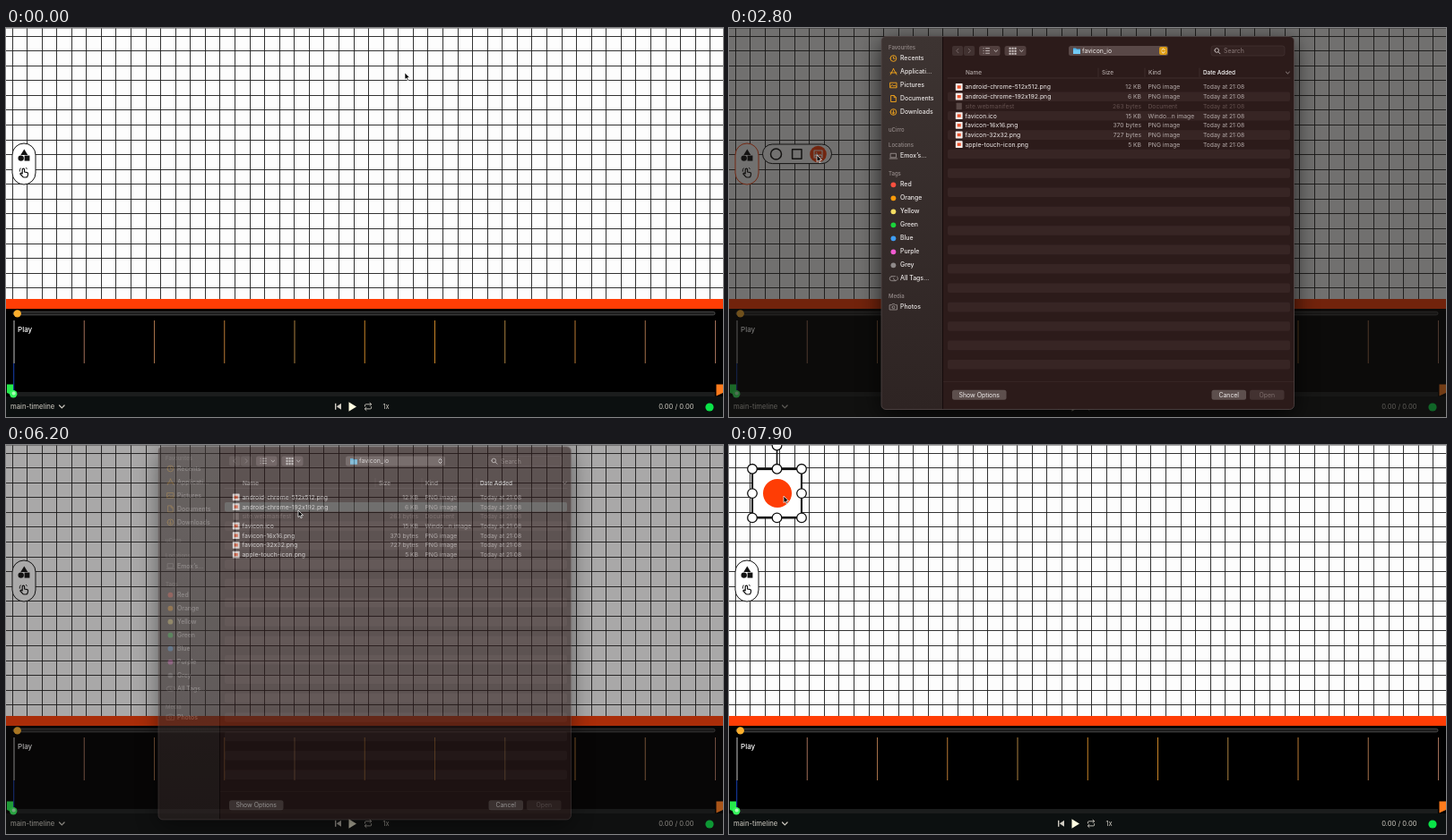
Write an HTML page that moves like this. It is 800 px wide and 435 px high and loops after 8 s.

```html
<!DOCTYPE html>
<html lang="en">
<head>
<meta charset="utf-8">
<title>Timeline editor</title>
<style>
html, body { margin: 0; height: 100%; overflow: hidden; background: #000; }
svg { display: block; width: 100vw; height: 100vh; font-family: Inter, Roboto, sans-serif; }
.line { fill: none; stroke: currentColor; stroke-linecap: round; stroke-linejoin: round; }
.menu { color: #111; }
.item circle:first-child { fill: none; }
.item.on circle:first-child { fill: #ff430f; }
.item.on { color: #fff; }
.window { filter: drop-shadow(0 6px 13px #000b); }
</style>
</head>
<body>
<svg id="stage" viewBox="0 0 800 435"></svg>
<script>
const LOOP = 8000, STEP = 100;
const range = n => [...Array(n).keys()];
const rect = (x, y, w, h, fill, r = 0, more = '') =>
  `<rect x="${x}" y="${y}" width="${w}" height="${h}" rx="${r}" fill="${fill}" ${more}/>`;
const circle = (x, y, r, fill, more = '') =>
  `<circle cx="${x}" cy="${y}" r="${r}" fill="${fill}" ${more}/>`;
const path = (d, color, width = 1) =>
  `<path class="line" d="${d}" style="color:${color}" stroke-width="${width}"/>`;
const shape = (d, fill) => `<path d="${d}" fill="${fill}"/>`;
// y is the vertical middle of the text
const text = (x, y, s, size, fill, more = '') =>
  `<text x="${x}" y="${y + size * 0.36}" font-size="${size}" fill="${fill}" ${more}>${s}</text>`;
const group = (id, inner, more = '') => `<g id="${id}" ${more}>${inner}</g>`;
const INK = '#111', ORANGE = '#ff3d05', CREAM = '#cfcbc2', MIDDLE = 'text-anchor="middle"';

function grid() {
  const cols = range(49).map(i => `M${Math.floor(7 + i * 16.57) + 0.5} 0V303`);
  const rows = range(18).map(i => `M0 ${Math.floor(9 + i * 16.58) + 0.5}H800`);
  return rect(0, 0, 800, 304, '#fdfdfd') + path(cols.join('') + rows.join(''), '#1c1c1c', 0.9)
    + rect(0, 0, 800, 0.6, '#777');
}

function timeline() {
  const tints = ['#a06e58', '#a5704a', '#b97a35', '#a98040', '#c88428'];
  const ticks = range(11).map(i => {
    const color = i ? tints[Math.min(i - 1, 10 - i)] : '#c4c4c4';
    return rect(8.5 + i * 78.25, 327, 1, 48, color);
  }).join('');
  return rect(0, 303, 800, 11, ORANGE) + rect(0, 314, 800, 98, '#000')
    + rect(8, 317.3, 783, 3.6, '#1d1d1d', 1.8, 'stroke="#555" stroke-width=".8"')
    + circle(12.7, 319.4, 4.2, '#fbae2c') + ticks
    + rect(8.2, 375, 1, 34, '#173fae')
    + text(13, 337.5, 'Play', 8, '#fff', 'font-weight="500"')
    + rect(0, 412, 800, 23, '#0c1010') + rect(8, 407, 783, 5, '#1b1d1d')
    + shape('M1 398.5H8V411L1 408Z', '#25ea4c') + circle(8.2, 409.3, 4.2, '#35f55c')
    + circle(8.6, 408.6, 2, '#a8ffb8')
    + shape('M792.5 398.5H800V408L792.5 411.5Z', '#ff7b1c')
    + text(5, 423.5, 'main-timeline', 7.7, CREAM)
    + path('M59.5 422L62.3 424.8 65.1 422', CREAM, 1.2)
    + rect(367, 419.8, 1.4, 7, CREAM) + shape('M374 419.8V426.8L368.8 423.3Z', CREAM)
    + shape('M382.5 418.2V428.8L391 423.5Z', '#fffce1')
    + path('M400.5 423V421.8Q400.5 420.8 401.5 420.8H407.5M406 419.2L407.7 420.8 406 422.4M407.6 423.6V424.9Q407.6 425.9 406.6 425.9H400.6M402 424.3L400.3 425.9 402 427.5', CREAM, 0.9)
    + text(420.5, 423.5, '1x', 7.6, CREAM)
    + text(767.5, 423.5, '0.00 / 0.00', 7.6, CREAM, 'text-anchor="end"')
    + circle(785, 424, 4.6, '#0ae448');
}

function tools() {
  const item = (x, icon) => `<g class="item">${circle(x, 141, 9.3, 'none')}${icon}</g>`;
  const stroke = 'class="line" stroke-width="1.5"';
  return rect(7, 129, 26, 46, '#fff', 13, 'id="pill" stroke-width="1"')
    + shape('M20.3 135.6L24.3 142H16.3Z', INK) + circle(16.7, 145.6, 3.2, INK) + rect(20.6, 142.6, 5.8, 6, INK)
    + path('M18.2 162.5V158.4a1.2 1.2 0 0 1 2.4 0V161l2.9.6a1.4 1.4 0 0 1 1.1 1.6l-.5 2.3a2 2 0 0 1-2 1.5h-2a2 2 0 0 1-1.6-.8l-2.7-3.2 1-.9 1.4.8', INK, 1.2)
    + path('M15.2 160.2a4 4 0 0 1 1-3.3M22.3 156.5l1 .9', INK, 1)
    + group('menu', rect(37.5, 130, 77, 21.6, '#fff', 10.8, `stroke="${INK}"`)
      + item(52.5, circle(52.5, 141, 6, 'none', stroke))
      + item(75.8, rect(70.6, 135.8, 10.4, 10.4, 'none', 0, stroke))
      + item(99.5, '<path class="line" stroke-width="1.1" d="M95 137H104V145H95ZM95 143.5L98 141 100 143 101.8 141.6 104 143.5M97.6 139.3h.2"/>'),
      'class="menu"');
}

function sidebar() {
  const gold = '#f6a81c', grey = '#a39a99';
  const head = (y, s) => text(178, y, s, 6, '#958b8a', 'font-weight="500"');
  const item = (y, s) => text(191, y, s, 6.9, '#ece8e7', 'font-weight="500"');
  const places = [['Recents', 'M180 34a3.4 3.4 0 1 0 6.8 0a3.4 3.4 0 1 0-6.8 0M183.4 32v2.2h1.6'],
    ['Applicati…', 'M183.6 45.5L180.3 52M183.4 45.5L187 52M180 50H187'],
    ['Pictures', 'M180 61.2H187V66.8H180ZM180 65.5l2.2-2 1.8 1.6 1.2-1 1.8 1.5'],
    ['Documents', 'M181 75.5H184.4L186.3 77.5V82.5H181ZM184.2 75.7V77.7H186'],
    ['Downloads', 'M180 94a3.4 3.4 0 1 0 6.8 0a3.4 3.4 0 1 0-6.8 0M183.4 92v3.8M181.9 94.5l1.5 1.4 1.5-1.4']];
  const tags = [['Red', '#f9503f'], ['Orange', '#fb9a0a'], ['Yellow', '#f5dd62'], ['Green', '#1bd43b'],
    ['Blue', '#3f9df5'], ['Purple', '#f05bd0'], ['Grey', '#8f8a8a']];
  return head(22, 'Favourites')
    + places.map(([s, d], i) => path(d, gold, 0.9) + item(34 + i * 15, s)).join('')
    + head(114, 'uCirro') + head(131, 'Locations')
    + path('M180.5 140.3H186.5V144.8H180.5ZM179.2 146H187.8', grey, 0.8) + item(143, 'Emox’s…')
    + head(163, 'Tags')
    + tags.map(([s, c], i) => circle(183.4, 175.3 + i * 15, 2.9, c) + item(175 + i * 15, s)).join('')
    + path('M181.7 277.7a2.5 2.5 0 1 0 0 5H185.5M183.5 280a2.5 2.5 0 1 0 3.8-2.2M181.7 277.7H185.5', grey, 0.8)
    + item(280, 'All Tags…') + head(300, 'Media')
    + path('M179.5 309.7H181.5L182.3 308.7H184.7L185.5 309.7H187.5V315H179.5ZM182 312.2a1.5 1.5 0 1 0 3 0a1.5 1.5 0 1 0-3 0', grey, 0.8)
    + item(312, 'Photos');
}

function fileList() {
  const files = [['android-chrome-512x512.png', '12 KB'], ['android-chrome-192x192.png', '6 KB'],
    ['site.webmanifest', '263 bytes', 'Document'], ['favicon.ico', '15 KB', 'Windo…n image'],
    ['favicon-16x16.png', '370 bytes'], ['favicon-32x32.png', '727 bytes'], ['apple-touch-icon.png', '5 KB']];
  const heads = [[264, 'Name'], [416, 'Size'], [468, 'Kind'], [529, 'Date Added']];
  const dim = '#64514f', soft = '#b5abaa';
  return heads.map(([x, s], i) => text(x, 50, s, 6.4, i == 3 ? '#fff' : soft, 'font-weight="500"')).join('')
    + path('M412 45V54.5M464 45V54.5M525 45V54.5M244 56H626', '#463534', 0.7)
    + path('M621.5 49.2L623.4 51 625.3 49.2', soft, 0.8)
    + range(15).map(i => rect(244, 71.5 + i * 21.39, 382, 10.6, '#372524', 2)).join('')
    + rect(244, 71.5, 382, 10.6, '#c9960c', 2, 'id="pick"')
    + files.map(([name, size, kind = 'PNG image'], i) => {
      const y = 66 + i * 10.7, off = i == 2, tone = off ? dim : soft;
      const icon = off ? rect(253.6, y - 3.7, 6.2, 7.6, '#5a4947', 0.6)
        : rect(252.8, y - 3.9, 7.8, 7.8, '#f5ece9', 0.6) + rect(254.7, y - 1.7, 4, 3.4, '#f0552f');
      return icon + text(263.5, y, name, 6.85, off ? dim : '#f1edec')
        + text(460, y, size, 6.75, tone, 'text-anchor="end"')
        + text(467.5, y, kind, 6.75, tone) + text(529, y, 'Today at 21:08', 6.7, tone);
    }).join('');
}

function dialog() {
  const button = (x, w, s, fill, color, id) => rect(x, 404.8, w, 11, fill, 2.5, id ? `id="${id}"` : '')
    + text(x + w / 2, 410.3, s, 6.9, color, MIDDLE + (id ? ` id="${id}Text"` : ''));
  const dots = range(9).map(i => rect(312.5 + i % 3 * 3, 21.7 + Math.floor(i / 3) * 3, 2.1, 2.1, '#cfc6c5', 0.4)).join('');
  return rect(170, 9.5, 460.5, 417, '#2c1b1a', 5, 'class="window"')
    + shape('M238 9.5H175a5 5 0 0 0-5 5V421.5a5 5 0 0 0 5 5H238Z', 'url(#sideFill)')
    + rect(238, 10, 0.9, 416, '#140b0b')
    + group('side', sidebar())
    + rect(249, 20, 12.2, 11, '#413130', 2) + rect(262, 20, 12.2, 11, '#413130', 2)
    + path('M256 23.2L253.8 25.5 256 27.8M267.2 23.2L269.4 25.5 267.2 27.8', '#7d6e6d', 0.9)
    + rect(279, 20, 23.5, 11, '#513f3e', 2.5) + rect(307.5, 20, 24, 11, '#513f3e', 2.5)
    + path('M284 22.8h.2M286.5 22.8H290.5M284 25.5h.2M286.5 25.5H290.5M284 28.2h.2M286.5 28.2H290.5', '#cfc6c5', 0.9)
    + dots + path('M296 24.8L297.8 26.5 299.6 24.8M324.5 24.8L326.3 26.5 328.1 24.8', '#cfc6c5', 0.9)
    + rect(379, 20, 111, 11, '#594847', 2.5)
    + shape('M384 22.5H387L388 23.5H392V29H384Z', '#4fb4ea') + rect(384, 24.6, 8, 4.4, '#72caf5', 0.5)
    + text(394, 25.6, 'favicon_io', 6.9, '#f1edec')
    + rect(480, 21, 9, 9, '#dd9d16', 2, 'id="knob"')
    + path('M482.9 24.6L484.5 23 486.1 24.6M482.9 26.5L484.5 28.1 486.1 26.5', '#fff', 0.9)
    + rect(538, 20, 82, 11, '#332221', 2.5, 'stroke="#483837" stroke-width=".6"')
    + path('M541.9 25a2.3 2.3 0 1 0 4.6 0a2.3 2.3 0 1 0-4.6 0M546 26.8L548 28.8', '#cfc6c5', 0.9)
    + text(552, 25.8, 'Search', 6.9, '#8a7a79')
    + fileList() + rect(239, 395, 391, 0.6, '#3c2b2a')
    + button(249, 60.5, 'Show Options', '#5d4f4d', '#f1edec')
    + button(538.5, 38.5, 'Cancel', '#5d4f4d', '#f1edec')
    + button(581, 38.5, 'Open', '#433231', '#7d6d6b', 'open')
    + rect(170, 9.5, 460.5, 417, 'none', 5, 'stroke="#5b504f" stroke-width=".7"');
}

function handles() {
  const spots = range(9).filter(i => i != 4).map(i => [26 + i % 3 * 27.5, 26.8 + Math.floor(i / 3) * 27.3]);
  return path('M53.5 2V26', INK, 1.6) + rect(26, 27, 55, 54.5, 'none', 0, `stroke="${INK}" stroke-width="2"`)
    + [...spots, [53.5, 0.5]].map(([x, y]) => circle(x, y, 5.3, '#fff', `stroke="${INK}" stroke-width="1.3"`)).join('');
}

const stage = document.getElementById('stage');
stage.innerHTML = `<defs><linearGradient id="sideFill" x2="0" y2="1">
    <stop stop-color="#3d3432"/><stop offset="1" stop-color="#2e2423"/></linearGradient></defs>`
  + grid()
  + group('image', rect(26.5, 27.5, 54, 53, '#fff', 0, `stroke="${INK}" stroke-width="1.2"`) + circle(54, 54, 16, ORANGE))
  + group('handles', handles()) + tools() + timeline()
  + rect(0, 0, 800, 435, '#151312', 0, 'id="shade"')
  + group('dialog', dialog())
  + group('cursor', '<path d="M0 0V7.6L1.8 6 3 8.8 4.3 8.2 3.1 5.6H5.5Z" fill="#000" stroke="#fff" stroke-width=".7"/>');

const el = id => document.getElementById(id);
const set = (id, name, value) => el(id).setAttribute(name, value);
const show = (id, on) => set(id, 'visibility', on ? 'visible' : 'hidden');
const clamp = v => Math.max(0, Math.min(1, v));
const items = [...document.querySelectorAll('.item')];

// time, x, y of the pointer's stops
const stops = [[0, 445, 50], [200, 445, 50], [900, 22, 141], [1300, 22, 141], [1900, 98, 142], [2900, 98, 142],
  [3900, 326, 73], [6400, 326, 73], [6800, 231, 78], [6900, 231, 78], [7500, 61, 57], [LOOP, 61, 57]];

function pointer(t) {
  const i = stops.findIndex(s => s[0] > t);
  const [t0, x0, y0] = stops[i - 1], [t1, x1, y1] = stops[i];
  const p = (t - t0) / (t1 - t0), e = p * p * (3 - 2 * p);
  return [x0 + (x1 - x0) * e, y0 + (y1 - y0) * e];
}

function draw(t) {
  const [x, y] = pointer(t);
  set('cursor', 'transform', `translate(${x} ${y})`);

  // the page keeps its last hover while the file dialog is open
  const menu = t >= 1000 && t < 3600;
  const hoverX = pointer(Math.min(t, 2900))[0];
  show('menu', menu);
  set('pill', 'stroke', menu ? '#ff4a17' : INK);
  items.forEach((item, i) => item.classList.toggle('on', Math.abs(hoverX - 52.5 - i * 23.5) < 10));

  const away = t < 4000 ? 1 - clamp((t - 2500) / 300) : clamp((t - 6000) / 500);
  const active = t < 6000, picked = t >= 5000;
  show('dialog', away < 1);
  set('dialog', 'opacity', 1 - away);
  set('dialog', 'transform', `translate(0 ${-19 * away})`);
  set('shade', 'opacity', 0.6 * (1 - away));
  set('side', 'opacity', active ? 1 : 0.4);
  set('knob', 'fill', active ? '#dd9d16' : '#594847');
  set('pick', 'opacity', picked ? 1 : 0);
  set('pick', 'fill', active ? '#c9960c' : '#4b4a48');
  set('open', 'fill', picked && active ? '#c9960c' : '#433231');
  set('openText', 'fill', picked && active ? '#fff' : '#7d6d6b');

  show('image', t >= 6500);
  show('handles', t >= 7600);
}

function tick() {
  const t = performance.now() % LOOP;
  draw(Math.floor(t / STEP) * STEP);
  requestAnimationFrame(tick);
}
tick();
</script>
</body>
</html>
```
